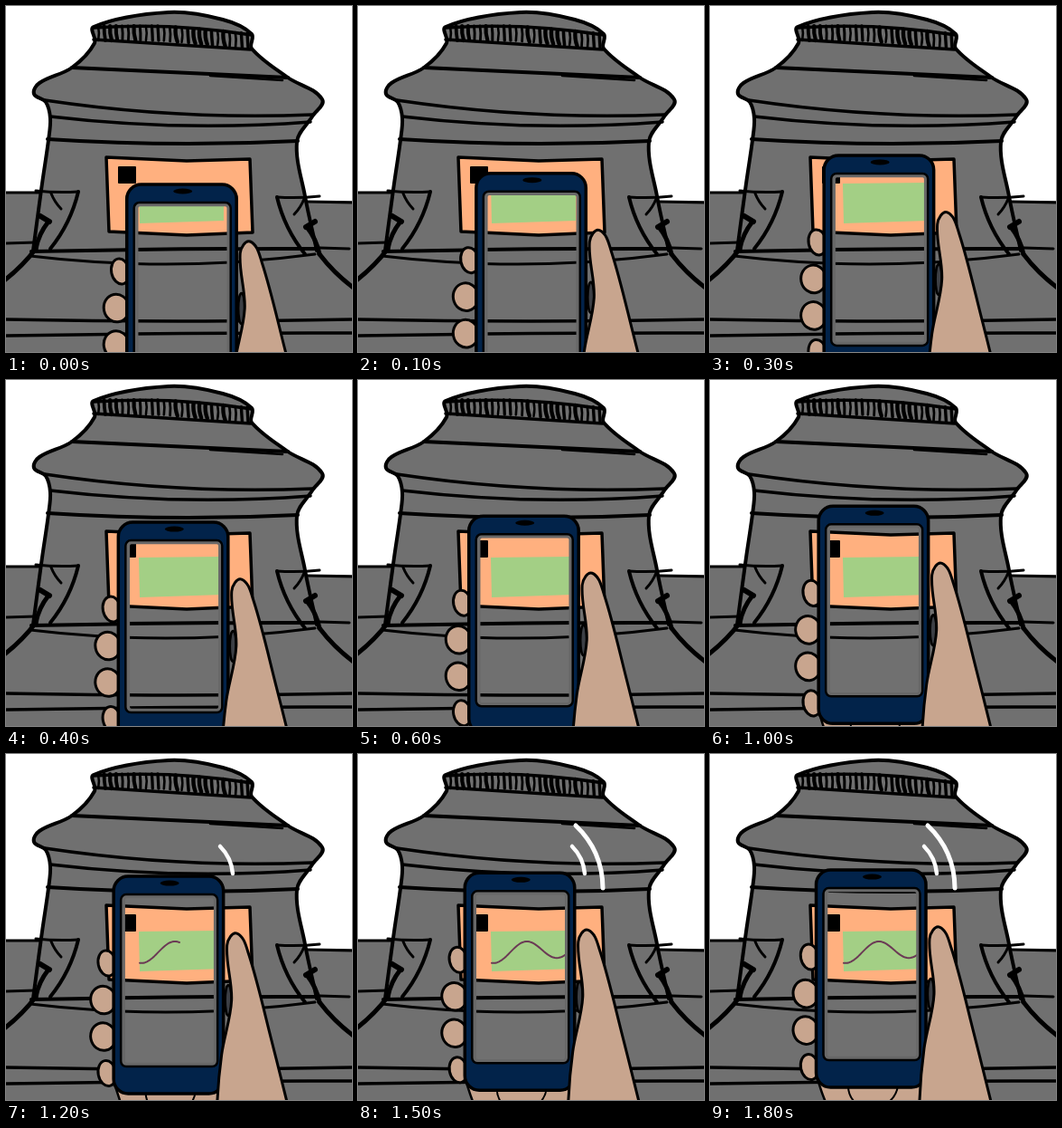
Write an HTML page with a canvas that moves like this. It is 383 px wide and 382 px high and loops after 2100 ms.

```html
<!DOCTYPE html>
<html lang="en">
<head>
<meta charset="utf-8">
<title>Phone scanning a plaque</title>
<style>
  html, body { margin: 0; width: 100%; height: 100%; overflow: hidden; background: #fff; }
  canvas { display: block; width: 100vw; height: 100vh; }
</style>
</head>
<body>
<canvas id="stage" width="383" height="382"></canvas>
<script>
const ctx = document.getElementById('stage').getContext('2d');
const STONE = '#707070', INK = '#000', PLATE = '#ffb07f', SKIN = '#c8a58e',
      NAVY = '#02234a', GREEN = '#a3cf85', RIM = '#686868', TRACE = '#6b3a55';
const LOOP = 2100, LAST_STEP = 10, SIGNAL_STEP = 8;

// the motion is stepped: four short holds, four longer ones, then the slowest
const holdOf = step => 100 * (1 + Math.floor(step / 4));

function stepAt(t) {
  let step = 0;
  while (step < LAST_STEP && t >= holdOf(step)) t -= holdOf(step++);
  return step;
}

// distance of the phone below its resting place, easing out
const dropAt = step => Math.max(0, 89 * Math.exp(-0.149 * step) - 20);

// smooth curve through x, y pairs; handles follow the segment length
function curve(...p) {
  const last = p.length / 2 - 1;
  const at = i => { i = 2 * Math.max(0, Math.min(last, i)); return [p[i], p[i + 1]]; };
  const slope = i => {
    const [ax, ay] = at(i - 1), [bx, by] = at(i + 1);
    const len = Math.hypot(bx - ax, by - ay);
    return [(bx - ax) / len, (by - ay) / len];
  };
  const path = new Path2D();
  path.moveTo(p[0], p[1]);
  for (let i = 0; i < last; i++) {
    const [ax, ay] = at(i), [bx, by] = at(i + 1), [sx, sy] = slope(i), [ex, ey] = slope(i + 1);
    const h = Math.hypot(bx - ax, by - ay) / 3;
    path.bezierCurveTo(ax + sx * h, ay + sy * h, bx - ex * h, by - ey * h, bx, by);
  }
  return path;
}

// line between two points whose middle is pushed sideways by bow
function arc(x1, y1, x2, y2, bow = 0) {
  const k = 2 * bow / Math.hypot(x2 - x1, y2 - y1);
  const path = new Path2D();
  path.moveTo(x1, y1);
  path.quadraticCurveTo((x1 + x2) / 2 - (y2 - y1) * k, (y1 + y2) / 2 + (x2 - x1) * k, x2, y2);
  return path;
}

function poly(...p) {
  const path = new Path2D();
  for (let i = 0; i < p.length; i += 2) path.lineTo(p[i], p[i + 1]);
  path.closePath();
  return path;
}

function oval(x, y, rx, ry, turn = 0) {
  const path = new Path2D();
  path.ellipse(x, y, rx, ry, turn, 0, Math.PI * 2);
  return path;
}

function box(x, y, w, h, r) {
  const path = new Path2D();
  path.roundRect(x, y, w, h, r);
  return path;
}

function fill(path, color) {
  ctx.fillStyle = color;
  ctx.fill(path);
}

function stroke(path, width = 3.5, color = INK) {
  ctx.lineWidth = width;
  ctx.strokeStyle = color;
  ctx.stroke(path);
}

function shape(path, color, width) {
  fill(path, color);
  stroke(path, width);
}

function drawColumn() {
  const outline = curve(30, 270, 40, 196, 47, 148, 49, 124, 44, 106, 31, 97, 37, 85, 73, 68,
                        98, 41, 97, 23, 180, 7, 240, 15, 272, 31, 272, 47, 312, 79,
                        350, 103, 339, 122, 322, 150, 331, 210, 344, 270);
  shape(outline, STONE, 4);

  // ribbed band
  stroke(arc(97, 24, 272, 32, -5));
  stroke(arc(97, 37, 271, 48, 0));
  for (let x = 102; x < 270; x += 6.6) {
    const wobble = Math.sin(x * x);
    const top = 22 + Math.max(0, x - 170) * 0.085;
    stroke(arc(x, top, x + 1 + wobble, top + 16, wobble), 3.4 + wobble);
  }

  // mouldings
  stroke(arc(73, 68, 312, 79, 0), 4);
  stroke(arc(226, 77, 306, 82), 2.5);
  stroke(arc(43, 104, 339, 120, 7));
  stroke(arc(49, 122, 337, 128, 7));
  stroke(arc(46, 147, 323, 149, 4), 4);
}

function drawButtress() {
  stroke(arc(33, 204, 80, 205, 1), 3);
  stroke(arc(80, 205, 49, 268, -4), 4);
  stroke(arc(50, 207, 61, 224, 1), 3);
  stroke(arc(38, 232, 48, 238), 6);
  stroke(arc(47, 238, 33, 268, 2), 5);
  stroke(arc(0, 262, 33, 261), 3);
  stroke(arc(33, 268, -6, 306, -2), 5);
}

function drawGround() {
  shape(poly(-5, 206, 36, 206, 334, 216, 390, 217, 390, 390, -5, 390), STONE, 3);
}

function drawSteps() {
  stroke(arc(28, 271, 342, 268, -1), 4);
  stroke(arc(27, 276, 342, 274, 10), 3);
  stroke(arc(0, 346, 383, 346, 2));
  stroke(arc(0, 364, 383, 361, -1));
}

function drawScene() {
  ctx.fillStyle = '#fff';
  ctx.fillRect(0, 0, 383, 382);
  drawGround();
  drawColumn();
  drawButtress();
  ctx.save();
  ctx.translate(380, 6);
  ctx.scale(-1, 1);
  drawButtress();
  ctx.restore();
  drawSteps();
  shape(poly(111, 167, 200, 171, 270, 169, 273, 250, 200, 253, 114, 249), PLATE, 3.5);
  fill(box(124, 177, 20, 19, 1), INK);
}

function drawOverlay(signal) {
  fill(poly(147, 196, 241, 195, 241, 237, 148, 240), GREEN);
  const trace = new Path2D();
  for (let x = 148; x < 148 + 45 * signal; x += 2) {
    trace.lineTo(x, 217.5 - 10.5 * Math.cos((x - 186) * Math.PI / 35) + (186 - x) * 0.08);
  }
  stroke(trace, 2, TRACE);
}

function drawHand() {
  for (let i = 0; i < 4; i++) {
    const off = (i - 1.5) ** 2;
    shape(oval(105.5 + 2.2 * off, 224 + 40.5 * i, 14.5 - 2 * off, 15.5 - 0.6 * off, -0.2), SKIN, 3);
  }
  shape(curve(118, 356, 128, 384, 140, 400, 240, 400, 240, 350), SKIN, 2.5);
  stroke(arc(153, 366, 160, 384, 2), 2);
  stroke(arc(208, 366, 198, 384, -2), 2);
}

function drawThumb() {
  shape(oval(244.5, 265, 3.5, 17), '#3c3f45', 2.5);
  shape(curve(232, 460, 232, 382, 237, 325, 248, 265, 243, 204, 254, 191,
              267, 214, 292, 308, 330, 460), SKIN, 3);
}

function drawPhone(signal, dx, dy) {
  shape(box(117.5, 128, 121.5, 240, 16), NAVY, 3.5);
  fill(oval(179.5, 135.5, 10.5, 3), INK);

  const view = box(125.5, 148, 107, 190, 6);
  ctx.save();
  ctx.clip(view);
  ctx.translate(-dx, -dy);
  drawScene();
  drawOverlay(signal);
  ctx.restore();
  stroke(box(128, 150, 102.5, 186, 4), 4.5, RIM);
  stroke(view, 2.5);
}

function drawWaves(signal) {
  if (signal > 0) stroke(arc(237, 102, 251, 132, -3), 4.5, '#fff');
  if (signal > 1) stroke(arc(241, 79, 271, 148, -8), 5, '#fff');
}

function draw(step) {
  const dy = dropAt(step), dx = dy * 0.235;
  const signal = Math.max(0, Math.min(2, step - SIGNAL_STEP + 1));
  drawScene();
  ctx.save();
  ctx.translate(dx, dy);
  drawHand();
  drawPhone(signal, dx, dy);
  drawThumb();
  ctx.restore();
  drawWaves(signal);
}

ctx.lineCap = ctx.lineJoin = 'round';
const start = performance.now();
let shown = -1;

function tick() {
  const step = stepAt((performance.now() - start) % LOOP);
  if (step !== shown) draw(shown = step);
  requestAnimationFrame(tick);
}
tick();
</script>
</body>
</html>
```
